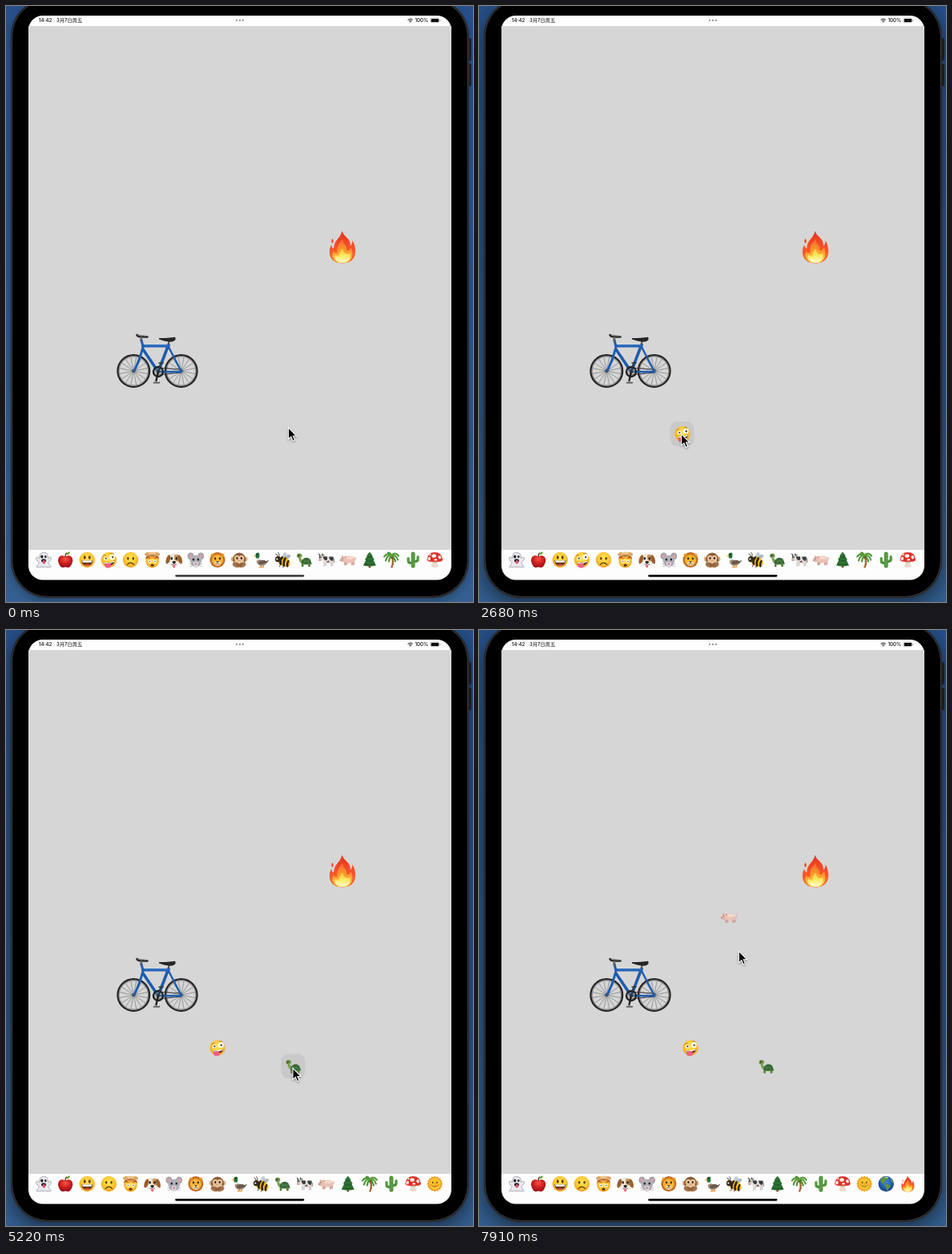
An HTML page for the animation above (8 s loop, 583x743 px).

```html
<!DOCTYPE html>
<html lang="zh">
<head>
<meta charset="utf-8">
<style>
html, body { margin: 0; width: 100%; height: 100%; overflow: hidden; background: #24508a; }
svg { display: block; }
text { font: 500 6.2px Inter, "Noto Sans CJK SC", "Noto Sans CJK", sans-serif; fill: #111; }
</style>
</head>
<body>
<svg id="stage" width="583" height="743" viewBox="0 0 583 743"></svg>
<script>
const circle = (x, y, r, fill) => `<circle cx="${x}" cy="${y}" r="${r}" fill="${fill}"/>`;
const oval = (x, y, rx, ry, fill, turn = 0) =>
  `<ellipse cx="${x}" cy="${y}" rx="${rx}" ry="${ry}" fill="${fill}" transform="rotate(${turn} ${x} ${y})"/>`;
const rect = (x, y, w, h, r, fill, more = '') =>
  `<rect x="${x}" y="${y}" width="${w}" height="${h}" rx="${r}" fill="${fill}" ${more}/>`;
const shape = (d, fill) => `<path d="${d}" fill="${fill}"/>`;
const line = (d, color, w, fill = 'none') =>
  `<path d="${d}" fill="${fill}" stroke="${color}" stroke-width="${w}" stroke-linecap="round" stroke-linejoin="round"/>`;
const ring = (x, y, r, color, w) =>
  `<circle cx="${x}" cy="${y}" r="${r}" fill="none" stroke="${color}" stroke-width="${w}"/>`;
const pair = (x, y, rx, ry, fill) => oval(-x, y, rx, ry, fill) + oval(x, y, rx, ry, fill);
const place = (art, x, y, s = 1) => `<g transform="translate(${x} ${y}) scale(${s})">${art}</g>`;
const stops = list => list.map((c, i) => `<stop offset="${i / (list.length - 1)}" stop-color="${c}"/>`).join('');
const radial = (id, cy, ...c) => `<radialGradient id="${id}" cx=".5" cy="${cy}" r=".65">${stops(c)}</radialGradient>`;
const linear = (id, ...c) => `<linearGradient id="${id}" x2="0" y2="1">${stops(c)}</linearGradient>`;

const face = circle(0, 0, 9.7, 'url(#face)');
const brown = '#5b3213';

// Each icon is drawn around 0,0 in a box of about 20 by 20.
const icons = {
  ghost: line('M-8 1Q-10.5 -1 -9 -3Q-7.5 -4 -5.5 -2Q-5.5 -9.3 0 -9.3T5.5 -2Q7.5 -4 9 -3Q10.5 -1 8 1Q6 2.5 5.8 3Q6 6 9.5 8.5Q5 10 2 8.5Q0 10 -2 8.5Q-5 10 -9.5 8.5Q-6 6 -5.8 3Q-6 2.5 -8 1Z', '#a4a6ae', .9, '#e9e9ee')
    + oval(-2.2, -4, 1.7, 2.1, '#26262c') + oval(2.3, -4, 1.3, 1.6, '#26262c')
    + oval(0, 1, 3, 2.2, '#26262c') + oval(.3, 2.8, 1.8, 2.3, '#e2566b'),
  apple: shape('M0 -4Q-4 -7 -7.5 -4Q-10.5 -.5 -8 5Q-5.5 10.5 -2 9.3Q0 8.7 2 9.3Q5.5 10.5 8 5Q10.5 -.5 7.5 -4Q4 -7 0 -4Z', 'url(#apple)')
    + line('M0 -4Q0 -7 1.2 -8.5', '#6b3a1c', 1.3) + shape('M1 -6.5Q2 -10.5 6 -10Q5 -6 1 -6.5Z', '#5fa52b'),
  grin: face + pair(3, -3, 1.3, 2.2, brown) + shape('M-7 .5H7Q6.4 7.5 0 7.5T-7 .5Z', brown)
    + shape('M-6.3 .8H6.3Q6 3.2 5 3.2H-5Q-6 3.2 -6.3 .8Z', '#fff') + oval(0, 6.2, 3, 1.1, '#dd4b50'),
  zany: face + circle(4.3, -3.6, 3.4, '#fff') + circle(4.8, -3.4, 1.2, brown)
    + circle(-3.8, -1.8, 2.3, '#fff') + circle(-3.6, -1.8, 1.1, brown)
    + shape('M-6.3 3Q0 4.6 7 .8Q6.6 6.5 1 7.4Q-4.8 7.6 -6.3 3Z', brown)
    + line('M-5.4 3.8Q0 5 6.2 1.9', '#fff', 1.3)
    + oval(-1, 7, 4, 3, '#ee5f88', -12) + line('M-7.5 -4.5Q-6 -6.5 -4 -6M2 -8Q4 -9 6 -8', '#a8641a', .7),
  frown: face + pair(3.2, -1.8, 1.2, 1.8, brown) + line('M-4.2 5.8Q0 1.4 4.2 5.8', brown, 1.2),
  blown: circle(0, 1.6, 8.3, 'url(#face)')
    + shape('M-8.6 -.5L-6 -2.6L-3 -1L0 -2.6L3 -1L6 -2.6L8.6 -.5L7.5 -4.5H-7.5Z', '#b9551d')
    + oval(0, -4, 4.2, 2.6, '#f2a640') + oval(0, -6.8, 9.4, 2.6, '#b9783f')
    + pair(5, -7.4, 3.8, 2, '#dda860') + oval(0, -8.2, 4.4, 1.8, '#eac78a')
    + pair(3.2, 2, 2, 2, '#fff') + pair(3.2, 2, .8, .8, brown) + oval(0, 6.6, 2.2, 1.7, brown),
  dog: oval(0, .5, 7.6, 8.5, '#ece6dd') + oval(3.4, -2.4, 3.2, 4.4, '#c9995f', -12)
    + oval(-7.4, -.6, 2.5, 5.8, '#9a5f2c', 18) + oval(7.4, -.6, 2.5, 5.8, '#9a5f2c', -18)
    + pair(3, -1.8, 1.3, 1.7, '#222') + oval(0, 4.8, 4.7, 4, '#fbf7f1')
    + oval(0, 2.8, 2.3, 1.6, '#222') + line('M-3 5.6Q-1 7 0 4.5Q1 7 3 5.6', '#443', .8) + oval(0, 7.8, 1.5, 2, '#e7657c'),
  mouse: pair(6.3, -4.6, 4, 4.3, '#9c9ea4') + pair(6.3, -4.4, 2.5, 2.9, '#d3a3aa')
    + shape('M0 -6Q8 -5 7.4 1.5Q5 8.5 0 9.2Q-5 8.5 -7.4 1.5Q-8 -5 0 -6Z', '#aeb0b6')
    + pair(3, -.5, 1.2, 1.5, '#222') + oval(0, 5.5, 3.2, 3, '#dcdcdf') + oval(0, 5, 1.6, 1.3, '#d97b8b')
    + line('M-3 6L-8 5M-3 7L-7.5 8M3 6L8 5M3 7L7.5 8', '#777', .45),
  lion: circle(0, 0, 9.4, '#bd5c16') + pair(6.2, -5.6, 2.4, 2.4, '#e69a35') + circle(0, 0, 8.2, '#d67b20')
    + oval(0, .2, 7, 6.4, '#f6b638') + pair(2.9, -1.8, 1.1, 1.5, '#352011')
    + oval(0, 4.5, 3.8, 2.8, '#fbe5b6') + shape('M-2 1.8H2L0 4Z', '#573019') + line('M-2.5 5Q-1 6.3 0 4.2Q1 6.3 2.5 5', '#573019', .7),
  monkey: pair(8, -1, 2.3, 2.9, '#d9ae7d') + oval(0, -.4, 8, 8.6, '#8a5c36')
    + pair(2.8, -2, 3.4, 3.7, '#e5c199') + oval(0, 3.4, 6.4, 4.7, '#e5c199')
    + pair(2.7, -2, 1, 1.4, '#2b190d') + pair(.8, .8, .4, .3, brown)
    + oval(-3.6, 6.3, 5, 3, '#a3724a', 18) + oval(3.6, 6.3, 5, 3, '#a3724a', -18)
    + line('M-4 4.5L-.6 5.6M4 4.5L.6 5.6M-3 6.5L-.4 7M3 6.5L.4 7', '#6d4628', .6),
  duck: line('M0 6V9H-2M3 6V9H1', '#ec8a20', 1.2)
    + shape('M-5 -1Q-7 6 0 7.5Q6 8 9.5 1Q4 3 0 0Z', '#a29080') + oval(1.6, 3, 4.8, 2.6, '#6d5a4c', -8)
    + line('M-4.5 -2.4L-4.2 -.8', '#eee', 3) + shape('M-3 -9Q-6.6 -9.4 -7 -6Q-7 -3 -5.8 -2H-2.5Q-1 -8 -3 -9Z', '#21713c')
    + shape('M-6.5 -6.5L-10 -4.5L-6.3 -4.2Z', '#f0b428') + circle(-4.8, -6.7, .7, '#111') + line('M6 3L9 1', '#333', 1),
  bee: oval(2, -5, 2.5, 4.6, '#c3ccd1', 25) + oval(6, -3.6, 2.2, 4.1, '#aab6bc', 55)
    + oval(1.6, 2.3, 8.2, 5.8, '#f3b913', 25) + line('M-.5 -3.2Q-3.8 1 -2.6 5M3.2 -2Q.4 3 1.6 7', '#2a2118', 2.6)
    + line('M7 1.5Q4.8 5 6 8', '#2a2118', 2.3) + circle(-5.8, -.8, 3.6, '#372a1a') + circle(-7, -1, 1.1, '#fff')
    + line('M-6 -4Q-6 -7 -8.5 -7.5M-4.5 -4Q-3.5 -7.5 -5.5 -9M-3 6L-4 8.5M1 7L.4 9.5', '#2a2118', .8),
  turtle: shape('M-4.5 -1Q-4 6 -1 6H7Q9.5 5.6 9.8 4.4L5 2Z', '#78a04f')
    + oval(-6.3, -5.2, 3.2, 2.7, '#6c9447') + line('M-6 -3.5Q-5.6 2.4 -2 3.8', '#789f4f', 2.8)
    + shape('M-4 4.4Q-3 -2.6 2.4 -2.8T8.8 4.4Q3 6.2 -4 4.4Z', '#35673b')
    + line('M-1.2 -1L.6 1.4L-.6 4M.6 1.4H4.3L6.4 -.6M4.3 1.4L5.4 4', '#678f4d', .7)
    + line('M-2.4 6V7.4M6 6V7.4', '#5b823e', 2.8) + circle(-7, -5.6, .8, '#141d11') + line('M-8.6 -3.7H-7', '#365a27', .5),
  cow: line('M-2.5 2V7.6M-.5 2V7M6.2 2V7.6M8 1V7', '#cfcac7', 1.5) + line('M8.8 -3Q10.5 -1 9.7 3', '#444', .8)
    + shape('M-6 -4.2L8.6 -3.8Q9.8 1 7.8 2.6L2 3.4L-3 3Q-5 1 -6 -4.2Z', '#e4dfdc')
    + shape('M-4 -4.3H1Q2.4 -.6 0 .8Q-3.4 0 -4 -4.3ZM3.6 -4H8.8Q9.6 .6 7.4 1.6Q4 .6 3.6 -4ZM0 3L3 .8L4.4 3.3Z', '#3d3c3e')
    + shape('M-8.4 -6L-4.4 -6L-5.2 .6Q-8.7 2.6 -9.4 -.2Z', '#dfd8d5') + shape('M-8.4 -6H-7L-7.5 -2L-9 -2Z', '#444')
    + oval(-7.7, .2, 1.8, 1.4, '#cfa29b')
    + line('M-8.3 -6L-9 -7.4M-5.2 -6L-4.7 -7.6M-4.2 -5.4L-2.6 -6', '#3a3737', 1.1) + circle(-6.5, -3.3, .7, '#111')
    + oval(3.6, 3.2, 1.3, 1, '#d99c9c'),
  pig: line('M-3.6 3V6M-1.6 3V5.4M5.2 3V6M7.4 2.4V5.4', '#cf9f90', 1.9)
    + oval(2, -.6, 7.7, 4.5, '#e9c2b5') + oval(2.6, -2.6, 6, 2, '#f4d8cc')
    + oval(-5.6, -1, 3.6, 3.5, '#ebc3b5') + oval(-9, .2, 1.1, 1.5, '#cf958a')
    + shape('M-4.6 -4.2L-2 -4.6L-2.8 -1.8ZM-7.8 -3.6L-7 -5.4L-5.2 -3.8Z', '#cd9587') + circle(-6.7, -1.6, .6, '#2a1714')
    + line('M9.3 -1Q10.6 -2 9.8 -3', '#cf9f90', .8) + line('M-7.8 1.6Q-6.4 2.3 -5.4 1.4', '#a06a60', .5),
  tree: rect(-1.3, 6, 2.6, 3.8, .4, '#7a4a25')
    + shape('M0 -10L4 -5L2.7 -5L6 -.5L4.5 -.5L8 7Q0 9 -8 7L-4.5 -.5L-6 -.5L-2.7 -5L-4 -5Z', '#2f7132')
    + line('M-3 -4Q0 -2 3 -4M-4.5 0Q0 3 4.5 0M-6 5Q0 7.5 6 5', '#1c5126', 1),
  palm: line('M1 -3Q3 4 .5 9', '#a9713b', 2.4) + line('M1 -1H3M1.4 2H3M1.3 5H2.6', '#74471f', .6)
    + line('M0 -5Q-5 -10 -9 -4M0 -5Q-5 -7 -7 1M0 -5Q-3 -2 -3 2M0 -5Q4 -11 9 -5M0 -5Q6 -7 8 0M0 -5Q4 -3 5 2M0 -5Q-1 -9 -4 -9', '#4c9232', 2)
    + line('M0 -5Q-4 -8 -8 -4M0 -5Q5 -9 8 -5', '#79b648', .7) + circle(.6, -3, 1.3, '#774721'),
  cactus: line('M-6 -2V1Q-6 4 -2 4M6 -4V-1Q6 2 2 2', '#4c8f3a', 3.2)
    + line('M0 -7.4V7.5', '#4c8f3a', 5) + line('M-1 -8V8M1 -8V8M-6 -2V2M6 -4V-1', '#7cb85a', .6),
  mushroom: shape('M-3 0H3Q2.6 5 4.5 8.5Q0 10.5 -4.5 8.5Q-2.6 5 -3 0Z', '#eadcc9') + oval(0, 2.3, 3.8, 1.4, '#cdb99f')
    + shape('M-9.8 0Q-9 -9.5 0 -9.5T9.8 0Q9 3 0 2.2Q-9 3 -9.8 0Z', '#dd3029')
    + oval(-1, -5, 2.8, 2.2, '#fff3ea') + oval(-7, -1.5, 1.7, 2.2, '#fff3ea', 15) + oval(6, -3.2, 1.8, 2.2, '#fff3ea', -25)
    + oval(1, -.1, 2, 1.1, '#fff3ea') + oval(-5.7, -6.4, 1.3, .9, '#fff3ea', -40),
  sun: shape('M' + Array.from({length: 32}, (_, i) => {
      const r = i % 2 ? 8.5 : 10, a = i * Math.PI / 16;
      return (r * Math.cos(a)).toFixed(1) + ' ' + (r * Math.sin(a)).toFixed(1);
    }).join('L') + 'Z', '#f29b1c')
    + circle(0, 0, 7.4, '#fbc531') + pair(2.6, -1.7, .9, 1.3, '#7b3f0c') + pair(4.5, 1.4, 1.3, .9, '#f09a35')
    + line('M-3 2.5Q0 5 3 2.5', '#7b3f0c', .8) + line('M0 -1V1.2', '#cd7f18', .8),
  earth: circle(0, 0, 9.7, 'url(#earth)')
    + shape('M-7.5 -5Q-4 -9.5 1 -9L2.5 -6L0 -5L-1 -2L-4 -1L-2 1Q-5 1 -6 -2ZM-1 0Q4 0 5.5 3Q3 5 2 8.5Q0 8 0 5Q-2 3 -1 0ZM5 -7Q8.5 -5 9 -1L7 -2Z', '#62943f')
    + line('M-1 -8Q1 -9 2.4 -7.5', '#e6efe6', 1),
  fire: shape('M-.4 -10Q.6 -7.6 3 -5.6Q5.2 -3.6 4.9 -.6Q6.4 -2 6.3 -4.2Q8.2 -.4 8.1 3Q7.6 10 0 10Q-7.8 10 -8.1 3Q-8.2 .6 -7 -1.4Q-6.8 .4 -5.4 1Q-5.4 -2.4 -3 -5Q-.6 -7.6 -.4 -10ZM-6.3 -5.4Q-5 -3.6 -6.3 -2.2Q-7.5 -3.4 -6.3 -5.4Z', 'url(#fire)')
    + shape('M.4 -5Q0 -3 2 -1Q3 .6 2.6 2.4Q4.6 2.2 5.4 .2Q8 7 2.6 9.7H-2.6Q-8 7 -5.6 2.6Q-4.6 4 -3.2 3.6Q-4 -1.4 .4 -5Z', 'url(#flame)')
    + shape('M.2 1Q.6 3.6 2.4 4.4Q4 4.6 4.6 3.6Q6 9 0 9.8Q-6 9 -4.4 4.8Q-3.4 6 -2 5.2Q-1.8 2.4 .2 1Z', 'url(#core)')
};

const wheel = (x, y) => {
  let spokes = '';
  for (let i = 0; i < 16; i++) {
    const a = (i + .5) * Math.PI / 8;
    spokes += `M${x} ${y}l${18 * Math.cos(a)} ${18 * Math.sin(a)}`;
  }
  return line(spokes, '#6b6b6b', .6) + ring(x, y, 18.2, '#8c8c8c', 1.3) + ring(x, y, 19.9, '#242424', 2.2) + circle(x, y, 2, '#444');
};
const blue = '#1d5cb0';
const bike = wheel(159.3, 455) + wheel(218.7, 455)
  + line('M190 451L219 453M190 460L219 457', '#333', .9)
  + line('M190 456H219L203 425', blue, 2.4)
  + line('M169 416L171 425Q167 441 160 455', blue, 3)
  + line('M171 423.7H203M171 428L190 456L203 422', blue, 3.6) + line('M173 423H202', '#4b8cdb', .9)
  + line('M203 421L203.5 416', '#555', 2) + shape('M191 414Q203 414 211 412.8Q213 416 209 418Q203 420 191 415.6Z', '#262626')
  + line('M163.5 410Q164 412.4 169 412.5L176.5 412.5', '#2a2a2a', 2.6) + line('M164 409.6L176 411.6', '#777', .7) + line('M168.5 413V418', '#666', 2)
  + ring(190, 456, 6, '#222', 2.4) + ring(190, 456, 3.8, '#888', .8) + circle(190, 456, 2.2, '#444')
  + line('M190 456L187.5 467', '#222', 2.4) + line('M190 456L193 446M191 445H196', '#333', 1.4) + line('M184.5 469.6H191.5', '#555', 1.6);

const defs = '<defs>'
  + radial('face', .4, '#ffe55b', '#fdcd35', '#f0971d') + radial('apple', .3, '#f4574a', '#d4221f', '#9d1218')
  + radial('earth', .4, '#3f83d6', '#2563b5', '#12386f')
  + linear('fire', '#e8331a', '#f4512a', '#f9702b') + linear('flame', '#f7692d', '#fc9a2f', '#ffcf3f')
  + linear('core', '#ffc93a', '#ffe862', '#fffcd0') + linear('wall', '#27508a', '#2a568f', '#345f90') + '</defs>';

const device = rect(577, 40, 4, 28, 1.5, '#252527') + rect(577, 72, 4, 28, 1.5, '#252527')
  + rect(6, -9, 572, 747, 46, '#252527', 'id="shell"')
  + rect(7.7, -7.3, 568.6, 743.6, 44.5, '#000', 'stroke="#48484b" stroke-width=".8"')
  + rect(28, 12, 528, 703.5, 18, '#fdfdfd') + rect(28, 25, 528, 653, 0, '#d6d6d6');

const status = '<text x="41" y="20.3">14:42</text><text x="63" y="20.3">3月7日周五</text><text x="510.5" y="20.3">100%</text>'
  + [288, 292, 296].map(x => circle(x, 17.8, .9, '#555')).join('')
  + line('M501.8 17Q504.7 14.4 507.6 17M503 18.4Q504.7 16.8 506.4 18.4', '#111', .9) + circle(504.7, 19.8, .8, '#111')
  + rect(530, 15.3, 10.8, 5.4, 1.5, 'none', 'stroke="#888" stroke-width=".5"') + rect(530.7, 16, 9.4, 4, .9, '#111')
  + rect(541.3, 17, .8, 2, .4, '#888');

stage.innerHTML = defs + rect(0, 0, 583, 743, 0, 'url(#wall)') + device + status
  + rect(211.3, 709, 161, 2.7, 1.4, '#444', 'id="bar"') + place(icons.fire, 420, 300.5, 2) + bike
  + '<g id="live"></g><g id="cursor">'
  + `<path d="M0 0V14.5L3.4 11.4L5.7 16.7L8.1 15.7L5.9 10.5H10.3Z" stroke="#fff" stroke-width="1.1" style="filter:drop-shadow(0 1px 1px #0006)"/></g>`;

const drags = [
  {name: 'zany', lift: 12, from: 13, to: 19, drop: 20, clear: 22, at: [264, 521]},
  {name: 'turtle', lift: 31, from: 32, to: 35, drop: 36, clear: 37, at: [359, 544]},
  {name: 'pig', lift: 43, from: 44, to: 49, drop: 52, clear: 53, at: [312, 358.5]}
];
const path = [
  [0, 352.5, 525.5], [8, 128.5, 690], [13, 128.5, 690], [19, 262.5, 521], [21, 262.5, 521], [27, 342, 695],
  [32, 342, 695], [35, 358, 546], [36, 358, 546], [40, 373.8, 695], [44, 373.8, 695], [49, 312, 359], [52, 312, 359], [53, 324.3, 400.3]
];
const ease = (n, a, b) => {
  const k = Math.min(1, Math.max(0, (n - a) / (b - a)));
  return k * k * (3 - 2 * k);
};
const mix = (a, b, k) => a + (b - a) * k;
const slot = i => 47 + i * 27.13, trayY = 690.5;

function draw(n) {
  const placed = drags.filter(d => n >= d.drop);
  const tray = Object.keys(icons).filter(name => !placed.some(d => d.name === name));
  let out = tray.slice(0, 19).map((name, i) => place(icons[name], slot(i), trayY)).join('');
  for (const d of placed) out += place(icons[d.name], ...d.at);

  const held = drags.find(d => n >= d.lift && n < d.clear);
  if (held) {
    const k = ease(n, held.from, held.to);
    const home = slot(Math.max(0, tray.indexOf(held.name)));
    const x = mix(home, held.at[0], k), y = mix(trayY, held.at[1], k);
    const age = n - held.lift;
    if (age && age < 3) out += circle(x, y, age * 16 + 4, `rgba(0,0,0,${.06 / age})`);
    out += k
      ? rect(x - 15.5, y - 15.5, 30, 31, 9, 'rgba(0,0,0,.06)')
      : rect(x - 13, y - 12.5, 26, 26, 2, '#fff', `style="filter:drop-shadow(0 1px 1px rgba(0,0,0,${age ? .22 : .1}))"`);
    out += place(icons[held.name], x, y);
  }
  live.innerHTML = out;

  const i = Math.max(1, path.findIndex(p => p[0] >= n));
  const a = path[i - 1], b = path[i], k = ease(n, a[0], b[0]);
  cursor.setAttribute('transform', `translate(${mix(a[1], b[1], k)} ${mix(a[2], b[2], k)})`);
  // The window gains a deeper shadow once it has the focus.
  shell.style.filter = n < 10 ? 'drop-shadow(0 4px 5px rgba(0,0,0,.25))' : 'drop-shadow(0 8px 12px rgba(0,0,0,.5))';
  bar.setAttribute('fill', n < 12 ? '#444' : '#000');
}

let last = -1;
function tick() {
  const n = Math.min(53, Math.floor((performance.now() % 8000 + 10.5) / 149.25));
  if (n !== last) draw(last = n);
  requestAnimationFrame(tick);
}
tick();
</script>
</body>
</html>
```
